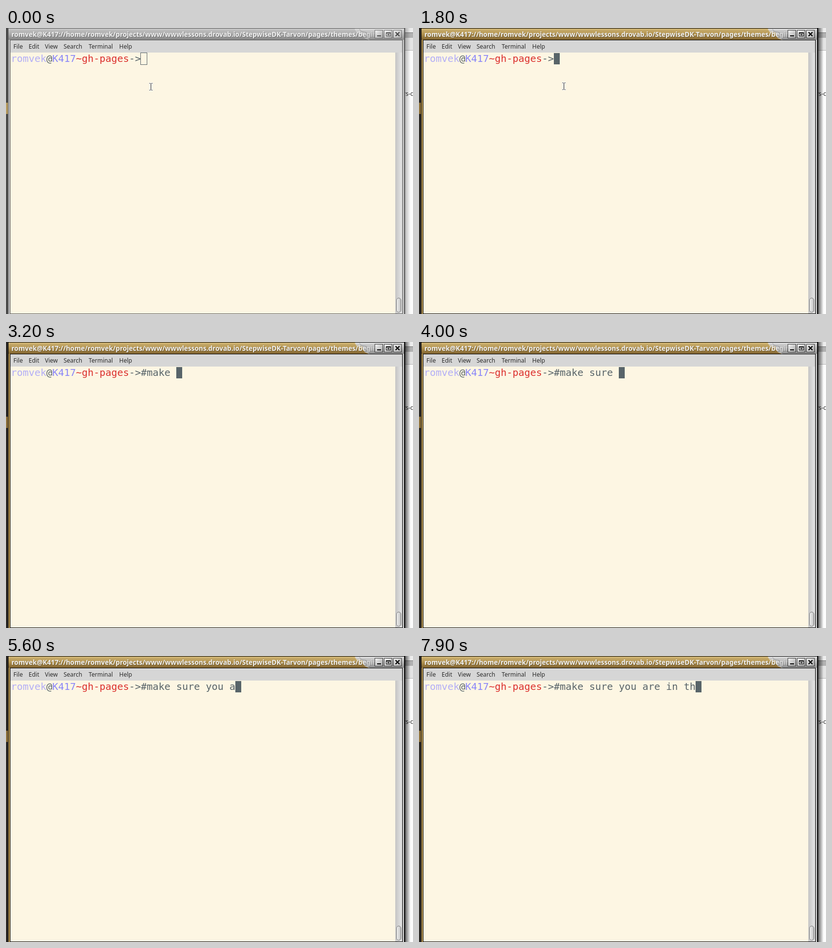
An HTML page for the animation above (8000 ms loop, 827 by 582 pixels).

```html
<!DOCTYPE html>
<html lang="en">
<head>
<meta charset="utf-8">
<title>Terminal typing</title>
<style>
  html, body { margin: 0; width: 100%; height: 100%; overflow: hidden; background: #fcfcfc; }
  svg { display: block; }
  text { white-space: pre; }
  .title { font: bold 13.5px "Noto Sans", sans-serif; fill: #f2f2f2; }
  .menu { font: 12px "Noto Sans", sans-serif; fill: #2c2c2c; }
  .term { font: 20px "DejaVu Sans Mono", monospace; letter-spacing: -.041px; fill: #586469; }
  .user { fill: #b3aef6; }
  .host { fill: #8985f8; }
  .branch { fill: #dc322f; }

  svg { --bar-top: #c6c6c6; --bar-mid: #aaa; --bar-low: #858585; --edge: #555; --side: #bcbcbc;
        --desk: #4c4c4c; --tab: #b59a62; --glyph: #4a4a4a; --shade: .28; }
  svg.focused { --bar-top: #d0b575; --bar-mid: #b1924f; --bar-low: #806330; --edge: #000; --side: #b09253;
        --desk: #2c2a28; --tab: #8d713c; --glyph: #000; --shade: .65; }
  .edge { fill: var(--edge); }
  .side { fill: var(--side); }
  .glyph { fill: none; stroke: var(--glyph); }
  .focused .hollow, svg:not(.focused) .block { display: none; }
</style>
</head>
<body>
<svg id="stage" width="827" height="582" viewBox="0 0 827 582">
  <defs>
    <linearGradient id="bar" x2="0" y2="1">
      <stop stop-color="var(--bar-top)"/>
      <stop offset=".5" stop-color="var(--bar-mid)"/>
      <stop offset="1" stop-color="var(--bar-low)"/>
    </linearGradient>
    <linearGradient id="silver" x2="0" y2="1">
      <stop stop-color="#dadada"/><stop offset="1" stop-color="#8e8e8e"/>
    </linearGradient>
    <linearGradient id="button" x2="1" y2="1">
      <stop stop-color="#f4f4f4"/><stop offset="1" stop-color="#a9a9a9"/>
    </linearGradient>
    <linearGradient id="trough">
      <stop stop-color="#c4c4c4"/><stop offset="1" stop-color="#e6e6e6"/>
    </linearGradient>
    <linearGradient id="thumb">
      <stop stop-color="#f3f3f3"/><stop offset="1" stop-color="#bdbdbd"/>
    </linearGradient>
    <linearGradient id="shadow">
      <stop stop-color="#000" stop-opacity="var(--shade)"/><stop offset="1" stop-color="#000" stop-opacity="0"/>
    </linearGradient>
    <linearGradient id="fade" gradientUnits="userSpaceOnUse" x1="722" x2="750">
      <stop stop-color="#fff"/><stop offset="1" stop-color="#fff" stop-opacity=".25"/>
    </linearGradient>
    <mask id="titleMask"><rect x="8" width="741" height="25" fill="url(#fade)"/></mask>
  </defs>

  <!-- desktop and the window behind -->
  <rect width="5" height="582" fill="var(--desk)"/>
  <rect y="152" width="4" height="23" fill="var(--tab)"/>
  <g>
    <rect x="809" width="18" height="10" fill="#ededed"/>
    <rect x="809" y="9" width="18" height="11" fill="#b2b2b2"/>
    <rect x="809" y="9" width="18" height="1" fill="#777"/>
    <rect x="809" y="20" width="18" height="26" fill="#e4e4e4"/>
    <rect x="809" y="45" width="18" height="1" fill="#b5b5b5"/>
    <text class="menu" x="807" y="138">rs-c</text>
    <rect x="810" width="12" height="582" fill="url(#shadow)"/>
  </g>

  <!-- window frame -->
  <rect class="edge" x="4" width="807" height="582"/>
  <rect class="side" x="5" y="1" width="3" height="581"/>
  <rect x="806" y="1" width="3" height="581" fill="#c2c2c2"/>
  <rect x="5" y="1" width="804" height="23" fill="url(#bar)"/>
  <path d="M709 1L713 7L724 9L729 20L738 24H809V1Z" fill="url(#silver)"/>
  <path d="M709 2L713 8L724 10L729 20L738 24" fill="none" stroke="#f0f0f0" stroke-opacity=".7"/>
  <path d="M718 2L722 7L732 9L736 18" fill="none" stroke="#666" stroke-opacity=".5"/>
  <g class="title" mask="url(#titleMask)">
    <text id="titleShade" x="12" y="19" fill="#000" style="fill:#000" opacity=".3"></text>
    <text id="title" x="11" y="18"></text>
  </g>
  <g id="buttons"></g>
  <g class="glyph" stroke-width="2">
    <path d="M754 16H762"/>
    <path d="M772.5 9.5H781.5V16.5H772.5Z" stroke-width="1"/>
    <path d="M772 10H782M775 13.5H779"/>
    <path d="M791.5 8.5L799.5 16.5M799.5 8.5L791.5 16.5" stroke-width="2.4"/>
  </g>

  <!-- menu bar, terminal, scrollbar -->
  <rect x="9" y="25" width="796" height="25" fill="#d6d6d6"/>
  <g id="menu" class="menu"></g>
  <rect x="9" y="50" width="782" height="531" fill="#fdf6e3"/>
  <rect x="791" y="50" width="14" height="531" fill="url(#trough)"/>
  <rect x="793.5" y="549.5" width="9" height="29" rx="4.5" fill="url(#thumb)" stroke="#777"/>

  <g class="term">
    <text x="10" y="69"><tspan class="user">romvek</tspan>@<tspan class="host">K417</tspan><tspan class="branch">~gh-pages</tspan>-&gt;</text>
    <text id="typed" x="274" y="69"></text>
    <rect class="hollow" x="273.5" y="50.5" width="13" height="24" fill="none" stroke="#586469"/>
    <rect id="cursor" class="block" x="274" y="51" width="12" height="23"/>
  </g>

  <g id="pointer" fill="none">
    <path d="M291 112.5H298M291 126.5H298M294.5 113V126" stroke="#fff" stroke-width="3"/>
    <path d="M291.5 112.5H293.5M295.5 112.5H297.5M294.5 113V126M291.5 126.5H293.5M295.5 126.5H297.5" stroke="#111"/>
  </g>
</svg>
<script>
const LOOP = 8000, CELL = 12, TEXT_X = 274;
const POINTER_UP = 200, FOCUS = 1800, POINTER_HIDE = 2400;
const LINE = "#make sure you are in th";

// [time, number of characters on the line]
const KEYS = [
  [2500, 1], [2700, 2], [2800, 3], [3000, 4], [3100, 5], [3200, 6],
  [3400, 7], [3600, 8], [3800, 9], [3900, 10], [4000, 11],
  [4500, 12], [4600, 13], [4700, 14], [5300, 15], [5600, 16],
  [5800, 17], [5900, 18], [6000, 20], [6100, 21], [6500, 22],
  [6700, 23], [7000, 22], [7200, 21], [7600, 22], [7800, 23], [7900, 24]
];

const $ = id => document.getElementById(id);
const add = (parent, tag, attrs, text = "") => {
  const el = document.createElementNS("http://www.w3.org/2000/svg", tag);
  for (const key in attrs) el.setAttribute(key, attrs[key]);
  el.textContent = text;
  parent.append(el);
};

const path = "romvek@K417://home/romvek/projects/www/wwwlessons.drovab.io/StepwiseDK-Tarvon/pages/themes/begin";
$("title").textContent = $("titleShade").textContent = path;

[["File", 15], ["Edit", 46], ["View", 79], ["Search", 117], ["Terminal", 168], ["Help", 230]]
  .forEach(([label, x]) => add($("menu"), "text", { x, y: 42 }, label));

[749.5, 768.5, 787.5].forEach(x =>
  add($("buttons"), "rect", { x, y: 4.5, width: 16, height: 16, fill: "url(#button)", stroke: "var(--glyph)", "stroke-opacity": .7 }));

function draw(t) {
  let count = 0;
  for (const [time, n] of KEYS) if (t >= time) count = n;
  $("stage").classList.toggle("focused", t >= FOCUS);
  $("typed").textContent = LINE.slice(0, count);
  $("cursor").setAttribute("x", TEXT_X + count * CELL);
  $("pointer").setAttribute("transform", `translate(0 ${t < POINTER_UP ? 0 : -1})`);
  $("pointer").setAttribute("visibility", t < POINTER_HIDE ? "visible" : "hidden");
}

const start = performance.now();
function tick() {
  draw((performance.now() - start) % LOOP);
  requestAnimationFrame(tick);
}
tick();
</script>
</body>
</html>
```
